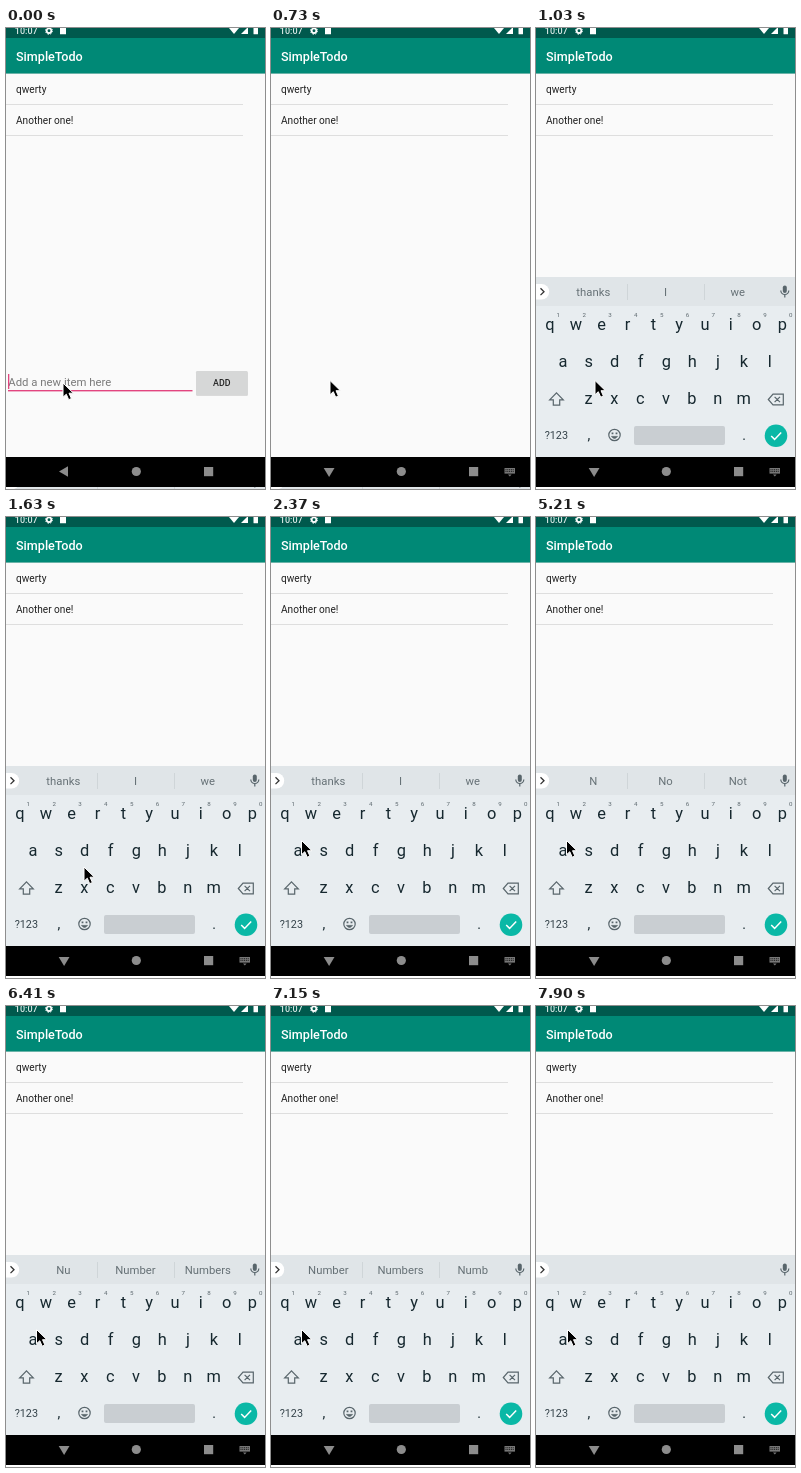
An HTML page for the animation above (8 s loop, 259 by 461 pixels).

```html
<!DOCTYPE html>
<html lang="en">
<head>
<meta charset="utf-8">
<title>Todo list</title>
<style>
  html, body { margin: 0; width: 100%; height: 100%; overflow: hidden; background: #fff; }
  svg { display: block; width: 259px; height: 461px; font-family: Roboto, sans-serif; }
  .mid { text-anchor: middle; }
  .key { font-size: 16.4px; fill: #16282f; }
  .tip { font-size: 6.2px; fill: #5b676d; }
  .word { font-size: 11.3px; fill: #667176; }
  .line { fill: none; stroke: #58656b; stroke-width: 1.2; }
</style>
</head>
<body>
<svg viewBox="0 0 259 461" xmlns="http://www.w3.org/2000/svg">
  <rect width="259" height="429" fill="#fafafa"/>

  <rect y="45" width="259" height="1" fill="#d5dedc"/>
  <rect width="259" height="45.5" fill="#008976"/>
  <rect width="259" height="10" fill="#00594d"/>
  <g fill="#fff">
    <text x="8.8" y="6" font-size="9" font-weight="500" fill="#dcebe8">10:07</text>
    <circle cx="43" cy="2.8" r="2.3" fill="none" stroke="#fff" stroke-width="1.7"/>
    <circle cx="43" cy="2.8" r="3.5" fill="none" stroke="#fff" stroke-width="1" stroke-dasharray="1.4 1.35"/>
    <path d="M54 0V6.2H60V-1H56Z"/>
    <path d="M223 0H233L228 6Z"/>
    <path d="M235 6H242V-1Z"/>
    <rect x="247.5" y="-2" width="4.5" height="8.3" rx=".6"/>
    <text x="10" y="33" font-size="12.6" font-weight="500">SimpleTodo</text>
  </g>

  <g font-size="10.1" fill="#222">
    <text x="10" y="65">qwerty</text>
    <text x="10" y="96">Another one!</text>
  </g>
  <path d="M0 76.5H237M0 107.5H237" stroke="#dedede"/>

  <g id="form">
    <text x="2.3" y="357.6" font-size="11.35" fill="#7b7b7b">Add a new item here</text>
    <rect x="2" y="362" width="184.5" height="1.4" fill="#e2457f"/>
    <rect id="caret" x="2" y="346" width="1.3" height="15" fill="#e2457f"/>
    <rect x="190" y="344" width="52" height="24" rx="1.5" fill="#000" opacity=".13"/>
    <rect x="190" y="343" width="51.7" height="24" rx="1.3" fill="#d6d7d7"/>
    <text class="mid" x="215.8" y="358.1" font-size="8.82" font-weight="500" fill="#222">ADD</text>
  </g>

  <g id="board">
    <rect y="249" width="259" height="181" fill="#e8edf0"/>
    <rect y="249" width="259" height="29" fill="#e0e5e8"/>
    <path d="M0 256H5.5A7.7 7.7 0 0 1 5.5 271.4H0Z" fill="#fff"/>
    <path d="M4.5 260.3L8 263.7L4.5 267.1" fill="none" stroke="#333" stroke-width="1.3"/>
    <path id="rules" d="M91.5 256V272M168.5 256V272" stroke="#cfd5d8"/>
    <g id="words"></g>
    <rect x="246.8" y="257.5" width="4" height="7.6" rx="2" fill="#58656b"/>
    <path class="line" d="M244.8 262.5A4 4 0 0 0 252.8 262.5M248.8 266.5V269.5"/>
    <g id="keys"></g>
    <path id="shift" class="line" d="M20.5 364.8L27.3 371.8H23.7V377.2H17.3V371.8H13.7Z"/>
    <path class="line" d="M237 366.2H247.3V376.8H237L232.3 371.5ZM238.6 368.8L244 374.2M244 368.8L238.6 374.2"/>
    <text class="mid" x="20.3" y="411.2" font-size="10.8" fill="#344249">?123</text>
    <text class="mid key" x="53" y="412" style="font-size:14px">,</text>
    <text class="mid key" x="208" y="412" style="font-size:14px">.</text>
    <circle class="line" cx="78.5" cy="407" r="5.7"/>
    <path class="line" d="M75.2 408.3Q78.5 413 81.8 408.3Z" style="fill:#58656b;stroke-width:.4"/>
    <path d="M75.6 405.3h1.8M79.6 405.3h1.8" stroke="#58656b" stroke-width="1.7"/>
    <rect x="98" y="398" width="91" height="19" rx="2" fill="#c9ced2"/>
    <circle cx="240" cy="407.8" r="11.3" fill="#0ab8a6"/>
    <path d="M235.2 408L238.6 411.4L245.2 404.6" fill="none" stroke="#fff" stroke-width="1.5"/>
  </g>

  <rect y="429" width="259" height="30" fill="#000"/>
  <g fill="#8c8c8c">
    <path id="back"/>
    <circle cx="130.3" cy="443.5" r="4.6"/>
    <rect x="198" y="439" width="9.2" height="9.2"/>
    <g id="switch">
      <rect x="233.5" y="440" width="10.5" height="5.6" fill="#777"/>
      <path d="M234.5 441.7H243M234.5 443.4H243" stroke="#000" stroke-width=".8" stroke-dasharray="1 .8"/>
      <path d="M237 446.6H240.6L238.8 448.4Z" fill="#777"/>
    </g>
  </g>

  <path id="arrow" d="M0 0V14.2L3.3 11.2L5.7 16.7L8.4 15.5L6 10.2H10.4Z" fill="#000" stroke="#fff" stroke-width="1" stroke-linejoin="round"/>
</svg>
<script>
const LOOP = 8000;
const $ = id => document.getElementById(id);

function addText(parent, cls, x, y, str) {
  const el = document.createElementNS('http://www.w3.org/2000/svg', 'text');
  el.setAttribute('class', 'mid ' + cls);
  el.setAttribute('x', x);
  el.setAttribute('y', y);
  el.textContent = str;
  parent.append(el);
  return el;
}

const letters = [];
[['qwertyuiop', 14], ['asdfghjkl', 27], ['zxcvbnm', 52.6]].forEach(([row, left], r) => {
  [...row].forEach((ch, i) => {
    const x = left + i * 25.83, y = 301.5 + r * 37;
    letters.push({ ch, y, el: addText($('keys'), 'key', x, y, ch) });
    if (!r) addText($('keys'), 'tip', x + 8.3, 289, (i + 1) % 10);
  });
});
const slots = [57.3, 129.5, 201.8].map(x => addText($('words'), 'word', x, 268, ''));

// Each track lists [start time, value]; a value holds until the next start.
const at = (track, t) => track.reduce((v, [start, next]) => t >= start ? next : v, track[0][1]);

const pointer = [
  [0, [57, 355]], [140, [58, 353]], [290, [59, 352.5]],
  [1330, [67, 356]], [1480, [97, 363]], [1630, [78, 350]],
  [1780, [44, 327]], [1930, [17, 308]], [2070, [19, 310]],
  [2370, [30.5, 323.5]], [7900, [31.5, 323.5]]
];
const caretOn = [[0, 1], [440, 0]];
const formOn = [[0, 1], [590, 0]];
const navOpen = [[0, 0], [590, 1]];
const rise = [[0, 190], [880, 62], [1030, 0]];
const upper = [[0, 0], [4610, 1], [5060, 0]];
const words = [
  [0, 'thanks I we'], [4610, 'Thanks I We'], [4910, 'N No Not'],
  [6410, 'Nu Number Numbers'], [6700, 'Num Number Numbers'],
  [6850, 'Numb Number Numbers'], [7000, 'Numbe Number Numbers'],
  [7150, 'Number Numbers Numb'], [7450, 'of one is'], [7600, '']
];

const show = (id, on) => $(id).setAttribute('visibility', on ? 'visible' : 'hidden');
const move = (id, x, y) => $(id).setAttribute('transform', `translate(${x} ${y})`);
let last = '';

function draw(t) {
  const open = at(navOpen, t), caps = at(upper, t), list = at(words, t);
  move('arrow', ...at(pointer, t));
  move('board', 0, at(rise, t));
  const form = at(formOn, t);
  show('form', form);
  show('caret', form && at(caretOn, t));
  show('switch', open);
  show('rules', list);
  $('back').setAttribute('d', open ? 'M52.7 440H63.5L58.1 449Z' : 'M62 438.3V448.8L53 443.5Z');
  $('shift').style.fill = caps ? '#58656b' : 'none';

  const state = caps + list;
  if (state === last) return;
  last = state;
  const parts = list.split(' ');
  slots.forEach((el, i) => el.textContent = parts[i] || '');
  letters.forEach(({ ch, y, el }) => {
    el.textContent = caps ? ch.toUpperCase() : ch;
    el.setAttribute('y', caps ? y + 1 : y);
  });
}

const begin = performance.now();
function frame(now) {
  draw(Math.max(0, now - begin) % LOOP);
  requestAnimationFrame(frame);
}
draw(0);
requestAnimationFrame(frame);
</script>
</body>
</html>
```
